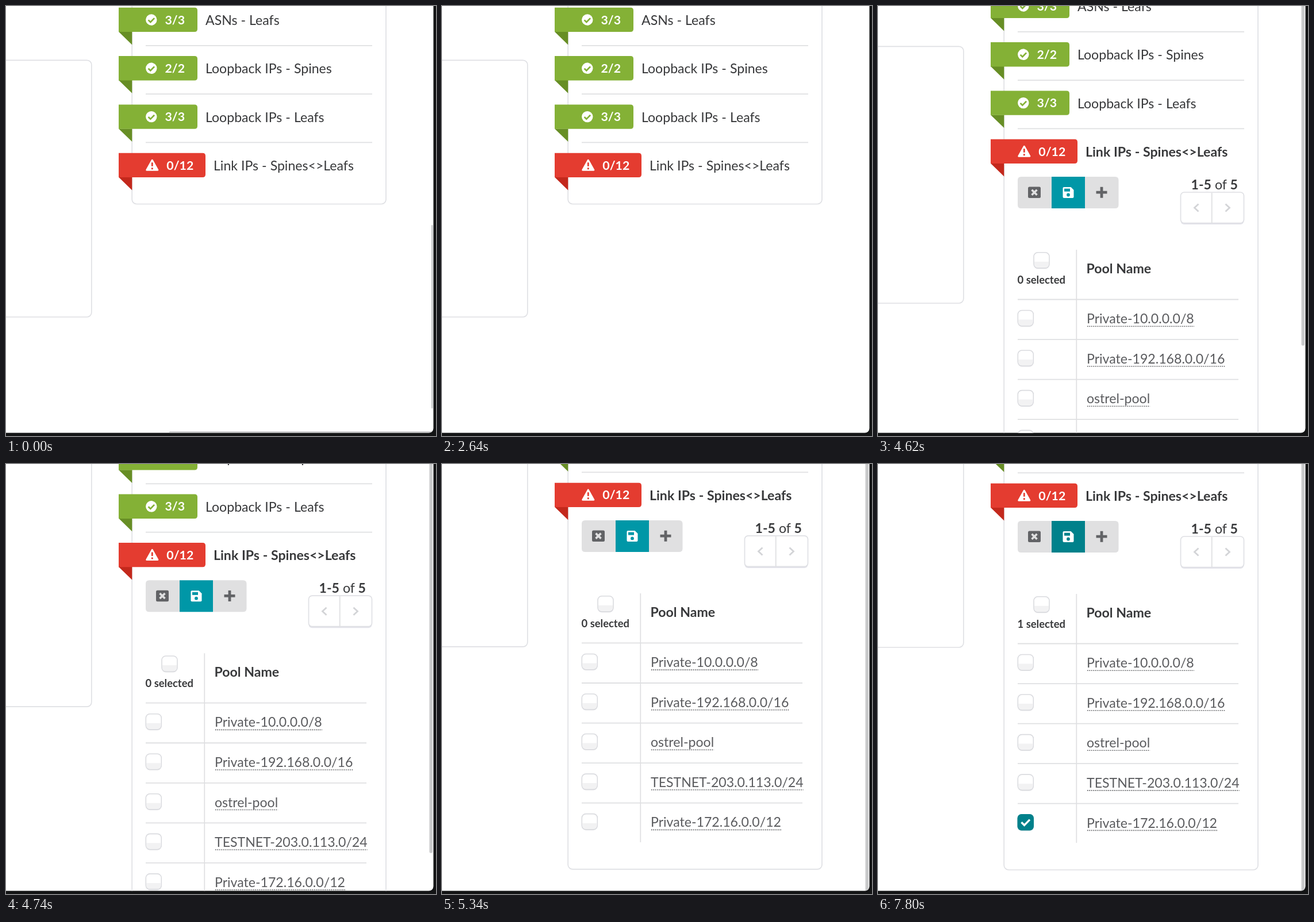
Write an HTML page that moves like this. It is 748 by 748 pixels and loops after 8000 ms.

```html
<!DOCTYPE html>
<html lang="en">
<head>
<meta charset="utf-8">
<title>Resource pools</title>
<style>
  html, body { margin: 0; width: 100%; height: 100%; overflow: hidden; background: #131415; }
  svg { display: block; width: 100vw; height: 100vh; }
  text { font: 23.1px Lato, sans-serif; fill: #38393b; word-spacing: var(--gap, 0); }
  .bold { font-weight: 700; }
  .count { font-size: 21.3px; font-weight: 700; fill: #fff; }
  .small { font-size: 18.4px; font-weight: 700; }
  .link { fill: #5b5c5f; }
  .frame { fill: none; stroke: #dfe0e4; stroke-width: 1.7; }
  .rule { stroke: #dfe0e2; stroke-width: 1.8; }
  .dots { stroke: #5b5c5f; stroke-width: 1.6; stroke-dasharray: 1.65 1.65; }
  .chevron { fill: none; stroke: #d3d4d7; stroke-width: 2.8; }
  .box { fill: #fff; stroke: #dadbdf; stroke-width: 1.6; }
  .hover .box { stroke: #bfc1cd; }
  .trace { stroke: #8d9094; }
</style>
</head>
<body>
<svg viewBox="0 0 748 748">
  <defs>
    <clipPath id="window"><rect x="-20" y="-20" width="763.5" height="762.5" rx="8"/></clipPath>
  </defs>
  <g clip-path="url(#window)">
    <rect width="748" height="748" fill="#fff"/>
    <g id="page">
      <rect class="frame" x="-40" y="94.3" width="188.8" height="446.7" rx="8"/>
      <rect class="frame" id="panel" x="219.2" y="-60" width="441.8" rx="8"/>
      <g id="rows"></g>
      <g id="details"></g>
    </g>
    <g id="bars" fill="#c6c7c8">
      <rect x="740" y="381" width="2.5" height="319" rx="1"/>
      <rect x="284" y="740" width="458" height="2.5" rx="1"/>
    </g>
    <rect id="thumb" x="736.5" y="-20" width="5.5" rx="2.5" fill="#c9cacb"/>
    <path id="trace" class="trace" d="M184 313.5H377M376.5 241V337"/>
    <circle id="cursor"/>
  </g>
</svg>
<script>
const LOOP = 8000, STEP = 60;
const $ = id => document.getElementById(id);

// Even out the space width between Lato releases.
const pen = document.createElement('canvas').getContext('2d');
pen.font = '100px Lato, sans-serif';
const gap = 0.26 - pen.measureText(' ').width / 100;
document.documentElement.style.setProperty('--gap', gap.toFixed(3) + 'em');

const text = (x, y, body, cls = '') => `<text x="${x}" y="${y}" class="${cls}">${body}</text>`;
const rule = (x1, y1, x2, y2, cls = 'rule') =>
  `<line x1="${x1}" y1="${y1}" x2="${x2}" y2="${y2}" class="${cls}"/>`;

function ribbon(row, count, title, alert) {
  const y = 2.8 + row * 84.3;
  const right = alert ? 347 : 333;
  const [face, fold] = alert ? ['#e43c30', '#c3281c'] : ['#84b136', '#678e25'];
  const icon = alert
    ? `<path d="M254.3 ${y + 12.5}l9.5 17h-19z" fill="#fff" stroke="#fff" stroke-width="3" stroke-linejoin="round"/>
       <path class="mark" d="M254.3 ${y + 16.5}v6.5M254.3 ${y + 25.5}v3" stroke="${face}" stroke-width="2.8"/>`
    : `<circle cx="252.8" cy="${y + 21.2}" r="9.7" fill="#fff"/>
       <path d="M247.6 ${y + 21.6}l3.7 3.7 6.8-7" fill="none" stroke="${face}" stroke-width="2.7"/>`;
  return `<g ${alert ? 'id="alert"' : ''}>
    <path class="fold" d="M196 ${y + 42}h23.3v22.7z" fill="${fold}"/>
    <path class="face" d="M196 ${y}H${right - 5}q5 0 5 5v32.3q0 5-5 5H196z" fill="${face}"/>
    ${icon}${text(alert ? 279.3 : 276.5, y + 28.8, count, 'count')}</g>
    ${text(right + 14, y + 30.2, title, alert ? 'title' : '')}
    ${alert ? '' : rule(243, y + 66, 637, y + 66)}`;
}

const checkbox = (x, y, id = '') => `<g id="${id}">
  <rect x="${x}" y="${y + 1.5}" width="27" height="27" rx="7" fill="#e2e2e5"/>
  <rect class="box" x="${x}" y="${y}" width="27" height="27" rx="7"/>
  <path class="shade" d="M${x + 1} ${y + 16}h25v4q0 6-6 6h-13q-6 0-6-6z" fill="#f2f2f3"/></g>`;

const chevron = (x, dir) => `<path class="chevron" d="M${x - 3.5 * dir} 368.5l${7 * dir} 6.5l${-7 * dir} 6.5"/>`;

$('rows').innerHTML = [
  ['3/3', 'ASNs - Leafs'],
  ['2/2', 'Loopback IPs - Spines'],
  ['3/3', 'Loopback IPs - Leafs'],
  ['0/12', 'Link IPs - Spines&lt;&gt;Leafs', true]
].map((row, i) => ribbon(i, ...row)).join('');

const pools = ['Private-10.0.0.0/8', 'Private-192.168.0.0/16', 'ostrel-pool',
  'TESTNET-203.0.113.0/24', 'Private-172.16.0.0/12'];

$('details').innerHTML = `
  <path id="cancel" d="M302 321h-53q-6 0-6 6v43q0 6 6 6h53z"/>
  <path id="save" d="M302 321h58v55h-58z"/>
  <path d="M360 321h52.500q6 0 6 6v43q0 6-6 6H360z" fill="#e0e0e1"/>
  <rect id="cancelIcon" x="261" y="338.500" width="22" height="19.500" rx="2.500"/>
  <path id="cancelMark" d="M267.500 343.700l9 9m0-9l-9 9" stroke-width="3.600"/>
  <path d="M323.500 339h12l5 5v12q0 2-2 2h-15q-2 0-2-2v-15q0-2 2-2z" fill="#fff"/>
  <path class="slot" d="M324 341.700h10v5h-10z"/><circle class="slot" cx="331" cy="352.500" r="2.900"/>
  <path d="M379.500 348.200h19M389 338.700v19" stroke="#626366" stroke-width="4.800"/>
  ${text(544.5, 343, '<tspan class="bold">1-5</tspan> of <tspan class="bold">5</tspan>')}
  <rect x="526.500" y="350" width="110" height="54" rx="6" fill="#e3e3ea"/>
  <rect class="frame" x="526.500" y="348" width="110" height="53.500" rx="6" style="fill:#fff"/>
  ${rule(580.7, 349, 580.7, 401)}${chevron(554, -1)}${chevron(608, 1)}
  ${checkbox(271, 452.8)}
  <text id="selected" class="small" x="242.500" y="506.700"></text>
  ${text(362.5, 488.7, 'Pool Name', 'bold')}
  ${rule(345.3, 448, 345.3, 881)}
  ${pools.map((name, i) => {
    const y = 534.5 + i * 69.55;
    return rule(243, y, 627, y) + checkbox(243.3, y + 19, i === 4 ? 'pick' : '')
      + text(363, y + 41.8, name, 'link') + rule(364, y + 46.7, 364, y + 46.7, 'dots');
  }).join('')}
  <g id="tick"><rect x="242.500" y="831" width="28.500" height="28.500" rx="7"/>
    <path d="M249.500 845.300l5 5 9.500-9.700" fill="none" stroke="#fff" stroke-width="3.400"/></g>`;

function sizeUnderlines() {
  document.querySelectorAll('.link').forEach(link =>
    link.nextElementSibling.setAttribute('x2', 363 + link.getComputedTextLength()));
}

// Linear interpolation through [time, value] points.
function track(points, t) {
  const i = points.findIndex(p => p[0] > t);
  if (i === 0) return points[0][1];
  if (i < 0) return points[points.length - 1][1];
  const [[t0, a], [t1, b]] = [points[i - 1], points[i]];
  return a + (b - a) * (t - t0) / (t1 - t0);
}

const scrollPath = [[4560, 0], [4620, 24], [4740, 118.8], [4860, 190], [4980, 223.6], [5280, 223.6], [5460, 222]];
const cursorX = [[3480, 304], [3660, 268], [3840, 205]];
const cursorY = [[3480, 278], [3660, 368], [3840, 450]];

const set = (el, attrs) => { for (const k in attrs) el.setAttribute(k, attrs[k]); };
const show = (id, on) => $(id).setAttribute('visibility', on ? 'visible' : 'hidden');
const within = (t, from, to) => t >= from && t < to;

function render(time) {
  const t = Math.floor(time / STEP) * STEP;
  const open = t >= 3240;
  const hot = within(t, 1140, 2580);
  const checked = t >= 6300;
  const scroll = track(scrollPath, t);

  set($('page'), { transform: `translate(0 ${-scroll})` });
  set($('panel'), { height: open ? 988 : 404.5 });
  $('details').style.display = open ? '' : 'none';
  document.querySelector('.title').style.fontWeight = open ? 700 : 400;

  const face = hot ? '#e82214' : '#e43c30';
  set(document.querySelector('#alert .face'), { fill: face });
  set(document.querySelector('#alert .mark'), { stroke: face });
  set(document.querySelector('#alert .fold'), { fill: hot ? face : '#c3281c' });

  const overCancel = within(t, 3600, 3780);
  const cancelFill = overCancel ? '#cecfd0' : '#e0e0e1';
  set($('cancel'), { fill: cancelFill });
  set($('cancelMark'), { stroke: cancelFill });
  set($('cancelIcon'), { fill: overCancel ? '#434447' : '#626366' });
  const teal = t >= 7740 ? '#00818b' : '#0097a7';
  set($('save'), { fill: teal });
  document.querySelectorAll('.slot').forEach(el => set(el, { fill: teal }));

  $('pick').classList.toggle('hover', t >= 5820);
  $('tick').style.display = checked ? '' : 'none';
  set($('tick'), { fill: '#00818b' });
  $('selected').textContent = `${checked ? 1 : 0} selected`;

  set($('bars'), { opacity: track([[1020, 1], [1200, 0]], t) });
  show('thumb', t >= 4200);
  set($('thumb'), { height: 589 + scroll * 0.907 });
  show('trace', hot);

  const moving = within(t, 3480, 3840);
  show('cursor', hot || moving);
  set($('cursor'), hot
    ? { cx: 301, cy: 277, r: 10, fill: '#6f5f9c', opacity: 0.45 }
    : { cx: track(cursorX, t), cy: track(cursorY, t), r: 13, fill: '#78a5ef', opacity: 0.93 });
}

sizeUnderlines();
const start = performance.now();
function tick() {
  render((performance.now() - start) % LOOP);
  requestAnimationFrame(tick);
}
tick();
</script>
</body>
</html>
```
